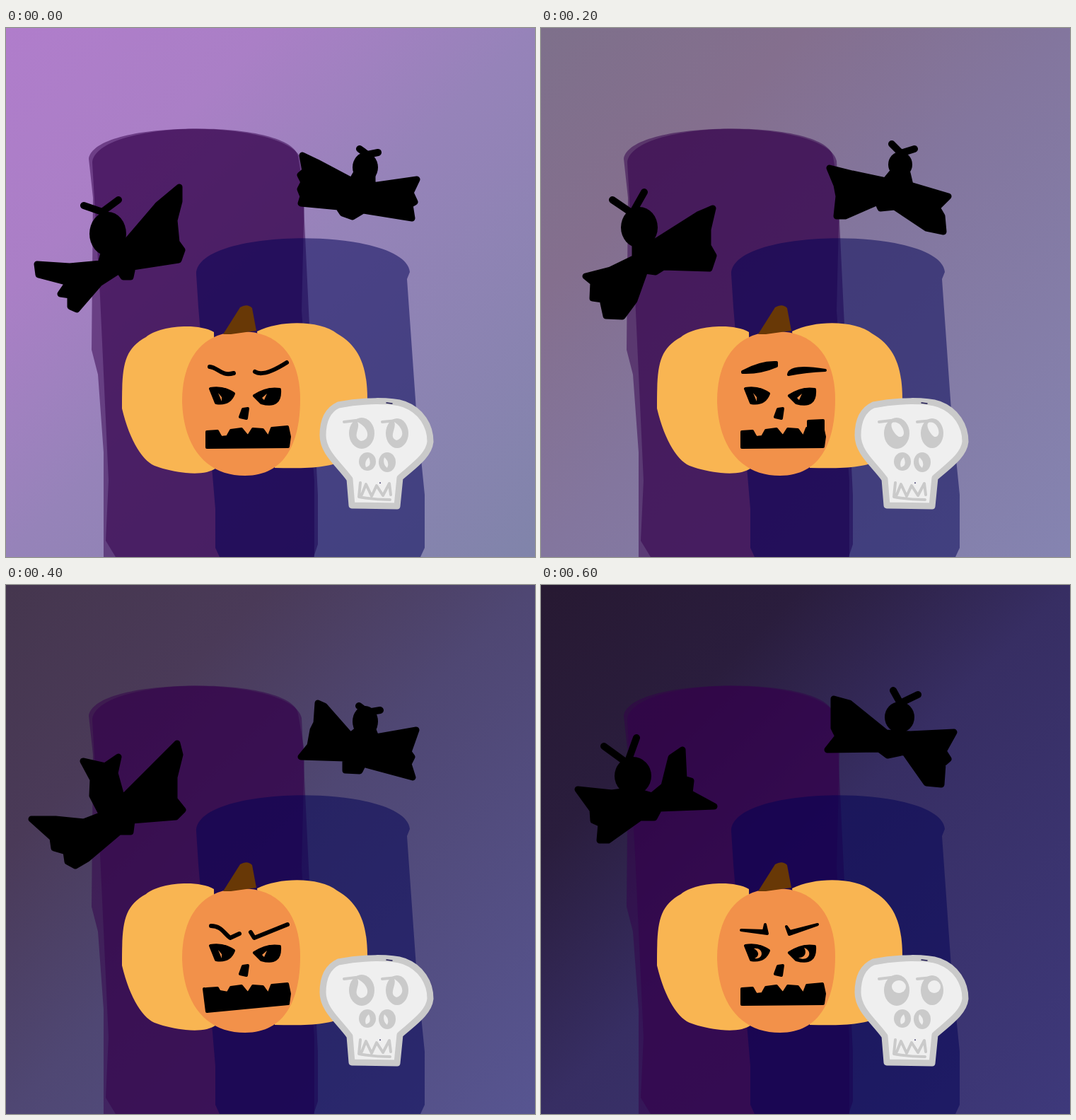
Recreate the animation shown at these times as an HTML page without scripts. Size 748x748 px, loop 0.8 s.

```html
<!DOCTYPE html>
<html lang="en">
<head>
<meta charset="utf-8">
<title>Halloween night</title>
<style>
html, body { margin: 0; width: 100%; height: 100%; overflow: hidden; }
svg { display: block; width: 100%; height: 100%; }

/* Four poses, each on screen for a quarter of the loop */
.pose { visibility: hidden; animation: pose 800ms step-end infinite; }
.fade { animation-delay: -600ms; }
.dusk { animation-delay: -400ms; }
.night { animation-delay: -200ms; }
@keyframes pose {
  0% { visibility: visible; }
  25%, 100% { visibility: hidden; }
}

/* Hand-drawn look: plain outlines with round strokes */
path { stroke-linecap: round; stroke-linejoin: round; }
.bat { stroke: #000; stroke-width: 9; }
.ears { fill: none; stroke: #000; stroke-width: 10; }
.ink { stroke: #000; stroke-width: 4; }
.brow { fill: none; stroke: #000; stroke-width: 6; }
.plum { fill: #33004b; opacity: .51; }
.navy { fill: #000054; opacity: .5; }
.lobe { fill: #f9b552; }
.flesh { fill: #f2914a; }
.bone { fill: #efefef; }
.shade { fill: #cacaca; }
.edge { stroke: #cacaca; stroke-width: 9; }
.tooth { fill: none; stroke: #cacaca; stroke-width: 4; }
</style>
</head>
<body>
<svg viewBox="0 0 748 748">
<defs>
  <linearGradient id="day" x2="1" y2="1">
    <stop stop-color="#b07dcb"/><stop offset=".25" stop-color="#aa7fc6"/><stop offset=".5" stop-color="#9683b9"/><stop offset="1" stop-color="#8084aa"/>
  </linearGradient>
  <linearGradient id="fade" x2="1" y2="1">
    <stop stop-color="#7e708b"/><stop offset=".25" stop-color="#846f8e"/><stop offset=".5" stop-color="#83769e"/><stop offset="1" stop-color="#8584b1"/>
  </linearGradient>
  <linearGradient id="dusk" x2="1" y2="1">
    <stop stop-color="#45364e"/><stop offset=".25" stop-color="#4a3a58"/><stop offset=".5" stop-color="#4f4773"/><stop offset="1" stop-color="#575591"/>
  </linearGradient>
  <linearGradient id="night" x2="1" y2="1">
    <stop stop-color="#271932"/><stop offset=".25" stop-color="#2a1d3d"/><stop offset=".5" stop-color="#372e63"/><stop offset="1" stop-color="#3e397b"/>
  </linearGradient>
  <path id="slits" class="flesh" d="M300 516L305 522V528ZM369 517L365 526 362 523Z"/>
  <path id="stare" class="bone" d="M497 557C516 567 514 583 502 584 488 578 502 566 497 557ZM549 557C564 567 563 580 552 583 540 578 553 566 549 557Z"/>
</defs>

<rect class="pose" width="748" height="748" fill="url(#day)"/>
<rect class="pose fade" width="748" height="748" fill="url(#fade)"/>
<rect class="pose dusk" width="748" height="748" fill="url(#dusk)"/>
<rect class="pose night" width="748" height="748" fill="url(#night)"/>

<!-- Towers -->
<path class="plum" d="M117 185C125 128 405 128 418 188L428 400 441 660V730L435 748H138V600L130 490 121 455 123 240Z"/>
<path class="plum" d="M122 190C130 128 405 128 413 182L422 235 418 400 436 640V748H155L141 725 145 640 133 380Z"/>
<path class="navy" d="M269 348C269 281 565 281 571 345L567 355 580 540 592 660V735L586 748H302L296 735V680L272 395Z"/>

<!-- Left bat -->
<g class="pose">
  <ellipse cx="144" cy="291" rx="26" ry="31"/>
  <path class="ears" d="M110 251L136 260 159 243"/>
  <path class="bat" d="M44 334L90 337 134 333 140 312 168 305 215 250 245 225 245 245 238 272 241 303 249 314 244 328 179 338 176 352 166 352 160 343 132 361 100 398 91 394 91 378 77 376 88 360 46 349Z"/>
</g>
<g class="pose fade">
  <ellipse cx="139" cy="282" rx="26" ry="29"/>
  <path class="ears" d="M101 243L129 262 146 232"/>
  <path class="bat" d="M63 351L98 342 133 325 133 305 162 302 222 264 243 255 236 285 236 308 244 322 238 340 173 338 162 345 147 343 132 385 115 408 92 407 87 384 73 382 74 360Z"/>
</g>
<path class="pose dusk bat" d="M36 331L70 331 110 335 136 325 122 298 123 275 109 249 140 256 159 243 154 266 164 302 212 254 242 224 246 240 238 272 238 303 250 318 240 328 178 333 176 349 160 349 115 387 98 397 87 391 85 377 68 372 66 358Z"/>
<g class="pose night">
  <ellipse cx="130" cy="270" rx="26" ry="27"/>
  <path class="ears" d="M89 228L122 252 135 216"/>
  <path class="bat" d="M52 289L100 294 130 290 157 298 174 284 184 244 200 233 202 274 212 277 210 294 245 313 167 316 160 329 140 329 95 361 83 361 85 338 74 333 73 318Z"/>
</g>

<!-- Right bat -->
<g class="pose">
  <ellipse cx="508" cy="197" rx="18" ry="21"/>
  <path class="ears" d="M500 171L511 179 526 176"/>
  <path class="bat" d="M419 180L440 190 489 216 496 204 518 207 518 223 581 214 572 233 578 246 571 250 574 269 505 258 490 267 476 262 470 253 417 248 420 238 416 228 421 218 416 208 423 202Z"/>
</g>
<g class="pose fade">
  <ellipse cx="508" cy="193" rx="17" ry="18"/>
  <path class="ears" d="M496 164L509 177 528 171"/>
  <path class="bat" d="M408 198L440 206 487 216 496 205 518 205 522 222 576 238 560 254 567 266 569 288 545 283 500 253 480 255 476 246 430 266 418 266 421 238 418 222Z"/>
</g>
<g class="pose dusk">
  <ellipse cx="508" cy="193" rx="18" ry="22"/>
  <path class="ears" d="M499 171L511 180 529 177"/>
  <path class="bat" d="M441 167L450 171 487 213 497 205 519 205 523 215 580 205 569 236 574 243 569 253 575 272 505 253 500 263 480 262 480 245 417 243 430 227 434 205 439 195Z"/>
</g>
<g class="pose night">
  <ellipse cx="507" cy="187" rx="21" ry="22"/>
  <path class="ears" d="M498 149L508 167 533 155"/>
  <path class="bat" d="M414 161L436 167 488 209 522 211 584 208 569 235 576 246 568 253 566 282 545 280 514 236 490 241 478 232 405 233 420 214 414 202Z"/>
</g>

<!-- Pumpkin -->
<path class="lobe" d="M294 430C270 416 215 422 198 437 165 455 164 480 164 538 175 585 195 615 213 620 235 628 280 636 297 622Z"/>
<path class="lobe" d="M355 429C390 412 445 414 468 432 500 450 511 480 511 525 511 620 470 624 380 622Z"/>
<path class="flesh" d="M333 429C280 429 249 465 249 528 251 595 285 633 338 633 395 633 416 585 416 525 416 470 390 429 333 429Z"/>
<path fill="#683806" d="M307 433L331 395Q341 389 348 396L354 428 318 433Z"/>
<path class="ink" d="M289 510Q308 507 322 517 316 533 297 530ZM351 520Q369 508 387 511 389 538 361 530ZM335 539L342 538 340 552 331 550Z"/>
<path class="ink" d="M284 571L299 570 304 579 313 578 318 569 333 567 342 578 349 567 363 568 371 579 376 566 398 564 401 578 399 592 284 593Z"/>

<g class="pose">
  <path class="brow" d="M288 479C300 480 304 493 322 488M352 486Q364 494 397 473"/>
  <use href="#slits"/>
</g>
<g class="pose fade">
  <path class="ink" d="M285 486Q310 472 333 473L333 478Q310 488 285 487ZM350 490Q352 476 402 484 375 485 350 490Z"/>
  <use href="#slits"/>
  <path class="ink" d="M378 588V556L399 555V588Z"/>
</g>
<g class="pose dusk">
  <path class="brow" d="M290 482C304 482 308 492 317 499L330 493M346 491L351 499 398 480"/>
  <use href="#slits"/>
  <path class="ink" d="M280 571L284 603 399 592Z"/>
</g>
<g class="pose night">
  <path class="ink" d="M283 488L315 489 317 480 320 493ZM347 483L351 494 391 480 352 490Z"/>
  <path class="flesh" d="M301 514C315 512 316 530 302 528 310 524 308 518 301 514ZM372 513C386 518 378 534 364 527 374 527 376 519 372 513Z"/>
</g>

<!-- Skull -->
<path class="bone edge" d="M470 533C505 526 545 526 563 532 587 541 600 562 600 585 598 605 575 620 557 636L553 676 489 675 486 638C470 616 448 600 448 576 448 555 455 540 470 533Z"/>
<path fill="none" stroke="#1d1850" stroke-width="1.5" d="M538 530L546 531M529 643V643.5"/>
<g class="shade">
  <ellipse cx="503" cy="573" rx="18" ry="22"/>
  <ellipse cx="553" cy="573" rx="16" ry="21"/>
  <ellipse cx="511" cy="613" rx="12" ry="13"/>
  <ellipse cx="539" cy="614" rx="12" ry="14"/>
</g>
<path class="tooth" d="M478 557L503 554M532 557L553 555M501 643L499 663Q520 667 543 667M503 660L509 645 517 662 524 647 533 661 542 644 544 660"/>
<path class="bone" d="M513 607Q518 619 509 621 506 613 513 607ZM535 607Q543 614 539 622 532 616 535 607Z"/>

<use class="pose" href="#stare"/>
<path class="pose fade bone" d="M497 558C511 554 520 580 506 578 500 575 492 562 497 558ZM548 558C562 554 568 580 556 578 551 575 543 562 548 558Z"/>
<use class="pose dusk" href="#stare"/>
<g class="pose night bone">
  <ellipse cx="506" cy="568" rx="10" ry="9"/>
  <ellipse cx="556" cy="568" rx="9" ry="9"/>
</g>
</svg>
</body>
</html>
```
